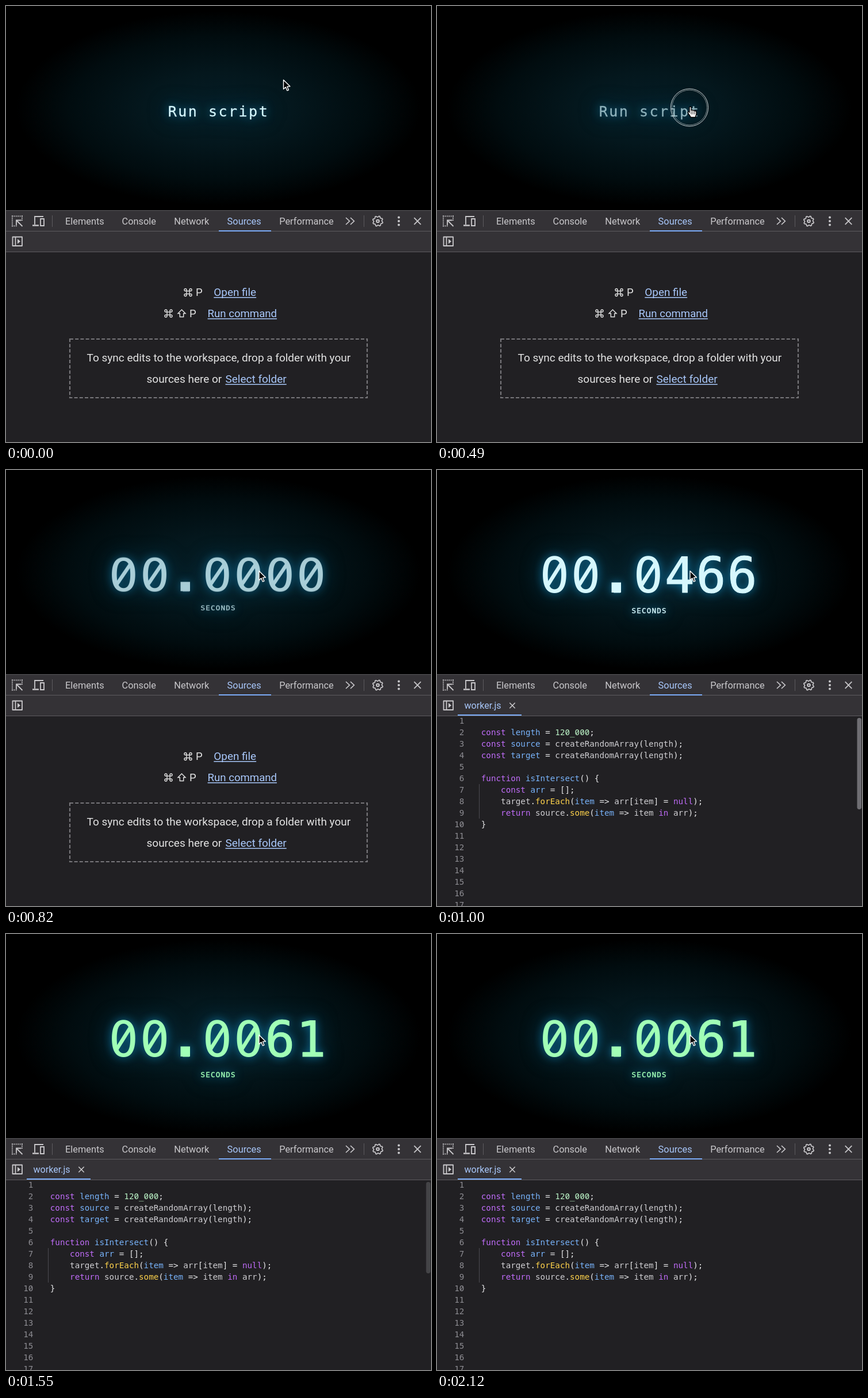
Write an HTML page with a canvas that moves like this. It is 739 px wide and 758 px high and loops after 2150 ms.

```html
<!DOCTYPE html>
<html lang="en">
<head>
<meta charset="utf-8">
<title>Run script</title>
<style>
html, body { margin: 0; width: 100%; height: 100%; overflow: hidden; background: #000; }
canvas { display: block; }
</style>
</head>
<body>
<canvas id="stage" width="739" height="758"></canvas>
<script>
const W = 739, H = 758, LOOP = 2150, CX = 369.5;
const MONO = '"DejaVu Sans Mono", monospace';
const SANS = 'Roboto, sans-serif';
const ICE = '#d6f7fd', GREEN = '#a1ffb6', BLUE = '#a8c7fa', GREY = '#c9c8cb';
const BAR = '#343236', BODY = '#212023';

const ctx = document.getElementById('stage').getContext('2d');

function layer(paint) {
  const c = document.createElement('canvas');
  c.width = W;
  c.height = H;
  paint(c.getContext('2d'));
  return c;
}

const clamp = v => Math.max(0, Math.min(1, v));
const phase = (t, a, b) => clamp((t - a) / (b - a));
const smooth = p => p * p * (3 - 2 * p);

function label(g, text, x, y, size, color, font = SANS) {
  g.font = `${size}px ${font}`;
  g.fillStyle = color;
  g.fillText(text, x, y);
}

function line(g, points, color, width = 1.8, close = false) {
  g.beginPath();
  points.forEach(([x, y]) => g.lineTo(x, y));
  if (close) g.closePath();
  g.strokeStyle = color;
  g.lineWidth = width;
  g.stroke();
}

function disc(g, x, y, r, color) {
  g.beginPath();
  g.arc(x, y, r, 0, 7);
  g.fillStyle = color;
  g.fill();
}

// Monospaced text with slashed zeros; needs a transparent layer.
function mono(g, text, x, y, size, pitch, color, bold = 0) {
  [...text].forEach((ch, i) => {
    const left = x + i * pitch;
    label(g, ch, left, y, size, color, MONO);
    if (ch === '0') {
      const mx = left + size * 0.301, my = y - size * 0.364;
      g.globalCompositeOperation = 'destination-out';
      g.beginPath();
      g.ellipse(mx, my, size * 0.11, size * 0.17, 0, 0, 7);
      g.fill();
      g.globalCompositeOperation = 'source-over';
      const dx = size * 0.135, dy = size * 0.215;
      line(g, [[mx - dx, my + dy], [mx + dx, my - dy]], color, size * 0.075);
    }
    if (bold) {
      g.strokeStyle = color;
      g.lineWidth = bold;
      g.strokeText(ch === '0' ? 'O' : ch, ch === '0' ? W * 2 : left, y);
    }
  });
}

function paintBackdrop(g) {
  g.fillStyle = '#000';
  g.fillRect(0, 0, W, H);
  g.save();
  g.translate(CX, 178);
  g.scale(370, 178);
  const glow = g.createRadialGradient(0, 0, 0, 0, 0, 1);
  glow.addColorStop(0, '#051d26');
  glow.addColorStop(0.35, '#04171d');
  glow.addColorStop(0.7, '#010c0f');
  glow.addColorStop(0.95, '#000');
  g.fillStyle = glow;
  g.fillRect(-1, -1, 2, 2);
  g.restore();
}

function paintGear(g, x, y) {
  const pts = [];
  for (let i = 0; i < 32; i++) {
    const a = (i + 0.5) / 32 * Math.PI * 2 + 0.13;
    const r = i % 4 < 2 ? 8.9 : 7.2;
    pts.push([x + r * Math.cos(a), y + r * Math.sin(a)]);
  }
  g.lineJoin = 'round';
  line(g, pts, GREY, 1.7, true);
  disc(g, x, y, 3.3, GREY);
  disc(g, x, y, 1.2, BAR);
}

function cross(g, x, y, r, width) {
  line(g, [[x - r, y - r], [x + r, y + r]], GREY, width);
  line(g, [[x - r, y + r], [x + r, y - r]], GREY, width);
}

function paintToolbar(g) {
  g.fillStyle = BAR;
  g.fillRect(0, 355, W, 73);
  g.fillStyle = '#5d5b5f';
  [355, 391, 427].forEach(y => g.fillRect(0, y, W, 1));
  [80, 622].forEach(x => g.fillRect(x, 364, 1, 20));

  // element picker
  g.fillStyle = GREY;
  for (let i = 0; i < 6; i++) {
    const d = i * 3.4;
    g.fillRect(10 + d, 364.5, 1.8, 1.8);
    g.fillRect(10, 364.5 + d, 1.8, 1.8);
    if (i < 3) {
      g.fillRect(27, 364.5 + d, 1.8, 1.8);
      g.fillRect(10 + d, 381.5, 1.8, 1.8);
    }
  }
  line(g, [[18, 381], [18, 372.5], [26.5, 372.5]], GREY, 1.8);
  line(g, [[18.5, 373], [28.5, 383]], GREY, 1.8);

  // device toggle
  line(g, [[65, 366], [50, 366], [50, 380]], GREY, 1.8);
  line(g, [[46, 381.5], [57, 381.5]], GREY, 2.4);
  line(g, [[60, 370], [66, 370], [66, 382], [60, 382]], GREY, 1.8, true);

  const tabs = [['Elements', 103], ['Console', 201.5], ['Network', 292.3], ['Sources', 384.6], ['Performance', 475.2]];
  tabs.forEach(([name, x]) => label(g, name, x, 380, 16.35, name === 'Sources' ? BLUE : GREY));
  g.fillStyle = '#7cacf8';
  g.fillRect(370, 390, 91, 2);

  [591, 599].forEach(x => line(g, [[x, 368], [x + 6.3, 374], [x, 380]], GREY, 1.7));
  paintGear(g, 646.5, 374);
  [367.5, 374, 380.5].forEach(y => disc(g, 683, y, 2, GREY));
  cross(g, 715.5, 374, 5.8, 1.8);

  // navigator toggle
  line(g, [[11.5, 401.5], [28, 401.5], [28, 417], [11.5, 417]], GREY, 1.8, true);
  line(g, [[16.5, 401], [16.5, 417]], GREY, 1.8);
  g.beginPath();
  g.moveTo(20, 405);
  g.lineTo(25, 409.2);
  g.lineTo(20, 413.5);
  g.fillStyle = GREY;
  g.fill();
}

function command(g, x, y) {
  g.strokeStyle = '#e3e3e3';
  g.lineWidth = 1.4;
  g.strokeRect(x - 2.5, y - 2.5, 5, 5);
  for (const sx of [-1, 1]) for (const sy of [-1, 1]) {
    g.beginPath();
    g.arc(x + sx * 4.5, y + sy * 4.5, 2, 0, 7);
    g.stroke();
  }
}

function link(g, text, x, y, size) {
  label(g, text, x, y, size, BLUE);
  g.fillRect(x, y + 2, g.measureText(text).width, 1.5);
}

function paintWelcome(g) {
  const ink = '#e3e3e3';
  command(g, 316.5, 498);
  label(g, 'P', 330, 504, 18.5, ink);
  link(g, 'Open file', 361.3, 504, 18.9);
  command(g, 282.5, 534.5);
  line(g, [[305.5, 528], [312, 534.5], [308.7, 534.5], [308.7, 540.5], [302.3, 540.5], [302.3, 534.5], [299, 534.5]], ink, 1.4, true);
  label(g, 'P', 319, 541, 18.5, ink);
  link(g, 'Run command', 350.6, 541, 18.6);
  g.setLineDash([6, 3.2]);
  line(g, [[111, 579], [628, 579], [628, 681], [111, 681]], '#77767a', 2.2, true);
  g.setLineDash([]);
  label(g, 'To sync edits to the workspace, drop a folder with your', 140.5, 618, 19, ink);
  label(g, 'sources here or', 244.5, 655, 19, ink);
  link(g, 'Select folder', 381.5, 655, 19);
}

const code = `
const length = 120_000;
const source = createRandomArray(length);
const target = createRandomArray(length);

function isIntersect() {
    const arr = [];
    target.forEach(item => arr[item] = null);
    return source.some(item => item in arr);
}`.split('\n');

const token = /\b(const|function|return|null|in)\b|(\b\d[\d_]*)|((?<=const |function )\w+|\w+(?= =>))|((?<=\.)\w+)|(\w+)|([^\w\s]+)/g;
const inks = ['#c06cf9', '#b9f0c4', '#78b3fb', '#fdd14b', '#cfced2', '#e6e6e8'];

function paintCode(g) {
  const size = 14.23, pitch = 8.568;
  for (let n = 1; n <= 17; n++) {
    const y = 421.3 + n * 20, num = String(n);
    mono(g, num, 47.3 - num.length * pitch, y, size, pitch, '#8d8c92');
    for (const m of (code[n - 1] || '').matchAll(token)) {
      const kind = m.slice(1).findIndex(Boolean);
      mono(g, m[0], 76.8 + m.index * pitch, y, size, pitch, inks[kind]);
    }
  }
  g.fillStyle = '#4b4a50';
  g.fillRect(73, 546, 1, 60);
  label(g, 'worker.js', 47.5, 415, 16.1, BLUE);
  cross(g, 131, 409.5, 4.7, 1.6);
  g.fillStyle = '#7cacf8';
  g.fillRect(36, 425, 111, 2);
}

function paintTimer(g, digits, color) {
  g.lineJoin = 'round';
  mono(g, digits, 178.4, 212.8, 86, 54.4, color, 1.2);
  // a heavier, square decimal point
  g.fillRect(303.5, 195.5, 16.5, 17.5);
  mono(g, 'SECONDS', 338.5, 249, 12.5, 8.76, color, 0.4);
}

function paintButton(g) {
  mono(g, 'Run script', 281.7, 192, 25, 17.55, ICE, 0.3);
}

const base = layer(g => {
  paintBackdrop(g);
  g.fillStyle = BODY;
  g.fillRect(0, 355, W, H - 355);
  paintToolbar(g);
});
const welcome = layer(paintWelcome);
const editor = layer(paintCode);
const button = layer(paintButton);

const timers = {};
function timer(digits, color) {
  return timers[digits + color] ||= layer(g => paintTimer(g, digits, color));
}

// Draws a glowing layer tilted about the horizontal axis.
function glowing(picture, squash, alpha, light = 1) {
  if (alpha <= 0 || squash <= 0) return;
  ctx.save();
  ctx.beginPath();
  ctx.rect(0, 0, W, 355);
  ctx.clip();
  ctx.translate(0, 182 * (1 - squash));
  ctx.scale(1, squash);
  ctx.globalAlpha = alpha;
  for (const [blur, color] of [[36, 'rgba(10,110,155,.6)'], [15, 'rgba(18,135,185,.75)']]) {
    ctx.shadowBlur = blur;
    ctx.shadowColor = color;
    ctx.shadowOffsetY = 2000;
    ctx.drawImage(picture, 0, -2000 / squash);
  }
  ctx.shadowColor = 'transparent';
  ctx.globalAlpha = alpha * light;
  ctx.drawImage(picture, 0, 0);
  ctx.restore();
}

const arrow = new Path2D('M0 0V16L3.8 12.6 6.3 18.6 8.9 17.5 6.4 11.6 11.4 11.3Z');
const hand = new Path2D('M-1 1C-1-1 2-1 2 1V6C3 4.6 5 5 5 6.4 6 5.4 8 5.8 8 7.2 9 6.5 11 7 11 8.8V12C11 14 9.5 15 9.5 18H1C1 15.5-4 11-4 9.6-4 8-2 8-1 9.6Z');

function cursor(t) {
  const p = smooth(phase(t, 30, 420));
  const x = 482.5 - 42.5 * p, y = 128.5 + 47 * p;
  const ring = Math.min(phase(t, 430, 460), 1 - phase(t, 560, 600));
  if (ring > 0) {
    ctx.globalAlpha = ring;
    for (const [r, color] of [[32.6, 'rgba(255,255,255,.8)'], [30.4, 'rgba(255,255,255,.5)']]) {
      ctx.beginPath();
      ctx.arc(439, 176.5, r, 0, 7);
      ctx.strokeStyle = color;
      ctx.lineWidth = 1;
      ctx.stroke();
    }
    ctx.globalAlpha = 1;
  }
  const over = y > 162 && t < 700;
  ctx.save();
  ctx.translate(x, y);
  ctx.lineJoin = 'round';
  ctx.lineWidth = 1.4;
  ctx.fillStyle = over ? '#fff' : '#000';
  ctx.strokeStyle = over ? '#000' : '#fff';
  ctx.fill(over ? hand : arrow);
  ctx.stroke(over ? hand : arrow);
  if (over) [2, 5, 8].forEach(px => line(ctx, [[px, 7], [px, 13]], '#000', 0.9));
  ctx.restore();
}

function digitsAt(t) {
  if (t >= 1060) return '00.0061';
  if (t < 970) return '00.0000';
  const ticks = 166 + Math.floor((t - 970) / 30) * 300;
  return '00.' + String(ticks).padStart(4, '0');
}

function draw(t) {
  ctx.drawImage(base, 0, 0);

  if (t < 700) {
    const out = phase(t, 580, 700);
    const light = 1 - 0.34 * phase(t, 370, 470);
    glowing(button, Math.cos(out * Math.PI / 2), 1 - out, light);
  } else {
    const turn = phase(t, 700, 862);
    glowing(timer(digitsAt(t), t < 1060 ? ICE : GREEN), Math.sin(turn * Math.PI / 2), phase(t, 700, 855));
  }

  if (t < 940) {
    ctx.drawImage(welcome, 0, 0);
  } else {
    ctx.drawImage(editor, 0, 0);
    ctx.globalAlpha = 1 - phase(t, 1420, 1660);
    ctx.fillStyle = '#6f6e73';
    ctx.beginPath();
    ctx.roundRect(730.5, 431, 7.5, 159, 3.7);
    ctx.fill();
    ctx.globalAlpha = 1;
  }
  cursor(t);
}

function tick() {
  draw(performance.now() % LOOP);
  requestAnimationFrame(tick);
}
tick();
</script>
</body>
</html>
```
